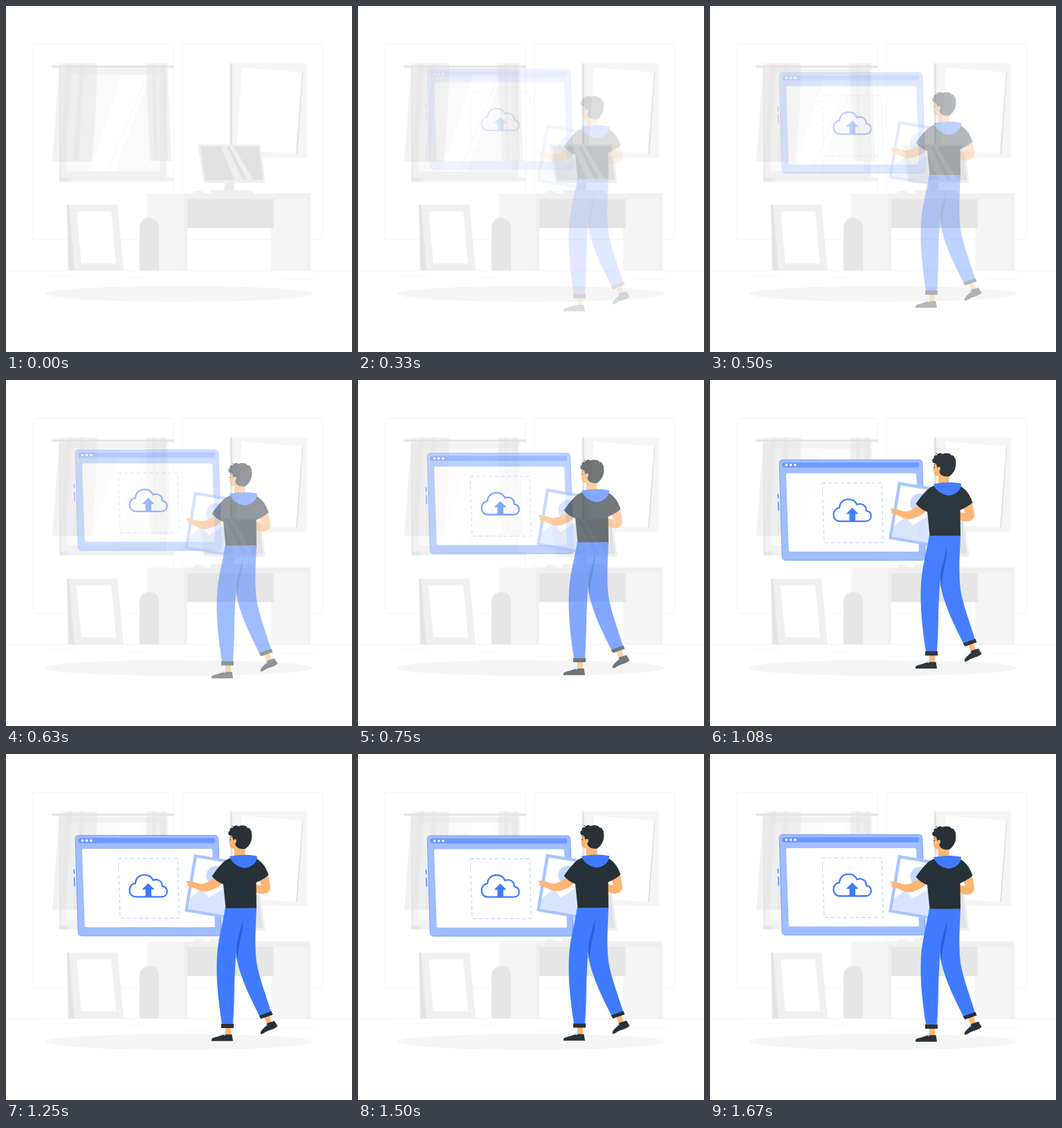
An HTML page for the animation above (1.71 s loop, 500 px wide and 500 px high).

```html
<!DOCTYPE html>
<html lang="en">
<head>
<meta charset="utf-8">
<title>Upload</title>
<style>
html, body { margin: 0; width: 100%; height: 100%; overflow: hidden; background: #fff; }
svg { display: block; width: 100%; height: 100%; }
</style>
</head>
<body>
<svg viewBox="0 0 500 500" xmlns="http://www.w3.org/2000/svg">
  <g id="room">
    <g fill="none" stroke="#f5f5f5">
      <rect x="39" y="55.5" width="203.5" height="282" rx="3"/>
      <rect x="255" y="55.5" width="203" height="282" rx="3"/>
    </g>
    <path d="M0 382.5H500" stroke="#f0f0f0" stroke-width=".8"/>
    <path d="M55 389.5H104M175 392.5H200M257 399.5H316M398 395.5H448" stroke="#f7f7f7" stroke-width=".8"/>
    <ellipse cx="250" cy="416" rx="194" ry="11.5" fill="#f5f5f5"/>

    <!-- window and curtains -->
    <path d="M77 91H232V248H77Z" fill="#f2f2f2"/>
    <path d="M77 248H242V253.5H77Z" fill="#f0f0f0"/>
    <path d="M77 248H90V253.5H77Z" fill="#e6e6e6"/>
    <path d="M77 91H79V248H77Z" fill="#e8e8e8"/>
    <path d="M88 99H222V239H88Z" fill="#fafafa"/>
    <path d="M167 99H202L146 239H120ZM205 99V106L157 239H148Z" fill="#fff"/>
    <rect x="66" y="86" width="177" height="3.4" rx="1" fill="#e6e6e6"/>
    <g fill="#e6e6e6" fill-opacity=".5">
      <path d="M77 83H132L130 150L124 225H67Z"/>
      <path d="M88 83H95L86 225H78ZM107 83H114L104 225H97Z" fill-opacity=".55"/>
      <path d="M202 83H233L239 224H208Z"/>
      <path d="M211 83H215L219 224H215ZM226 83H229L234 224H231Z" fill-opacity=".55"/>
    </g>

    <!-- wall picture -->
    <path d="M324 83H435V219.5H324Z" fill="#f5f5f5"/>
    <path d="M324 83H327V219.5H324Z" fill="#e3e3e3"/>
    <path d="M427 97L429.500 96L421 214.500L418 213.500Z" fill="#e0e0e0"/>
    <path d="M341 89L428 96L419 213.500L333 208Z" fill="#fff"/>

    <!-- leaning frame -->
    <path d="M88 287H94L102 382H90Z" fill="#e3e3e3"/>
    <path d="M91 287H161L170 382H99Z" fill="#f0f0f0"/>
    <path d="M102 297H152L159 372H109Z" fill="#fff"/>

    <!-- desk -->
    <path d="M204 271H262V382H204ZM383 279H435V382H383Z" fill="#f5f5f5"/>
    <path d="M257 271H440V382H435V279H262V382H257Z" fill="#f0f0f0"/>
    <path d="M262 279H387V321H262Z" fill="#e6e6e6"/>
    <path d="M193 382V320A14 14 0 0 1 221 320V382Z" fill="#e6e6e6"/>
    <path d="M270 271C270 266 287 266 287 271ZM296 266H353Q358 267 359 271H296Z" fill="#f0f0f0"/>
    <path d="M317 254H331L329 267H315Z" fill="#ebebeb"/>
    <path d="M277 200H367L375 255.500H286Z" fill="#f0f0f0"/>
    <path d="M281 203H365L371.500 251.500H288Z" fill="#e2e2e2"/>
    <path d="M310 203H319L342 251.500H331ZM323 203H329L357 251.500H349Z" fill="#f0f0f0"/>
  </g>

  <g id="tablet" opacity="0">
    <path d="M97.500 165.500H99L99.300 172H98ZM98 177H99.300L99.800 190H98.500Z" fill="#407bff"/>
    <path d="M105 116.300H302Q306.500 116.300 306.800 121L311 256Q311 261.500 306 261.500H110Q104.500 261.500 104.200 256.500L100.200 121.500Q100.200 116.300 105 116.300Z" fill="#9fbdff" stroke="#6c99ff" stroke-width=".9"/>
    <path d="M107 120H300Q302.500 120 302.500 123.700T300 127.500H107Q104 127.500 104 123.700T107 120Z" fill="#6c98ff"/>
    <g fill="#fff">
      <circle cx="110.500" cy="123.800" r="1.800"/>
      <circle cx="116.700" cy="123.800" r="1.800"/>
      <circle cx="123" cy="123.800" r="1.800"/>
      <path d="M112 135.700H296Q298 135.700 298.200 138L302 246.500Q302 249 300 249H116Q114 249 113.800 246.500L110 138Q110 135.700 112 135.700Z"/>
    </g>
    <path d="M162 149.700H248L250.300 236H165Z" fill="none" stroke="#b3caff" stroke-dasharray="5 4"/>
    <path d="M188 205C182 205 178.500 200.500 178.500 195.500C178.500 190 182 186 187 185.500C187.500 178 193 173.300 200 173.300C206 173.300 210.500 176.500 212.500 181C219 178.500 226 182 225.800 189.800C230 190.500 232.800 193.500 232.800 197.500C232.800 202 229.500 205 225 205Z" fill="none" stroke="#407bff" stroke-width="2.300"/>
    <path d="M205.500 185.500L214.700 194.500H210V205H201.500V194.500H196.500Z" fill="#407bff"/>
  </g>

  <g id="person" opacity="0">
    <!-- photo -->
    <g transform="translate(272 146) rotate(9.600)">
      <rect width="62" height="84" fill="#a9c5ff"/>
      <rect x="4.500" y="4.500" width="53" height="75" fill="#fff"/>
      <circle cx="36" cy="25.500" r="14" fill="#c6d8ff"/>
      <path d="M4.500 64L19 48L31 59L49 43L57.500 50V79.500H4.500Z" fill="#d9e5ff"/>
    </g>

    <!-- arms -->
    <g fill="#ffb573">
      <path d="M303 179C297 184 290 188 283 189C278 189 273 186 269 185.500L261 184.500C260 186 262 187.500 263.500 188C261.500 189 262 192 264.500 193L270 194C275 196 280 200 288 200C298 199 306 194 313 188Z"/>
      <path d="M378 175C380 182 382 189 382 194C382 200 377 203.500 371 203.500C366 203.500 362 202 360 199L361 190L369 191L365 182Z"/>
    </g>

    <!-- feet -->
    <path d="M317 395H325V410H317ZM373 381L380 378L384 390L378 394Z" fill="#ffb573"/>
    <path d="M297 414C297 411.500 301 411 305 410L315 406.500L326.500 406.500L328 416H297ZM368 406C367 402 370 400 373 397L378 390L388 387L392.500 394.500C389 399 380 400 375 403C372 405 370 406.500 368 406Z" fill="#263238"/>
    <path d="M312 407L316 403.500L317 408ZM374 396L375 391L378 393Z" fill="#c6d8ff"/>

    <!-- trousers -->
    <path d="M331 224H362C361 250 359 276 362 302C366 326 376 350 383 374L367 381C355 357 338 325 333 294Z" fill="#407bff"/>
    <path d="M317 223H351C345 246 337 266 333 285C329 320 331 356 328 391H312C307 360 303 325 305 292C307 267 313 247 317 223Z" fill="#407bff"/>
    <path d="M342 241C343 258 338 268 336 285L333.500 299C332 280 334 270 338 258Z" fill="#2d5fd0"/>
    <path d="M311 391H329V397.300H311ZM365.500 379.500L383.500 373L385.500 378L368.500 384Z" fill="#263238"/>

    <!-- shirt and hood -->
    <path d="M323 152C315 155 307 164 297.500 178C302 183 307 187 314 189.500L317.500 224H362L361.500 187C368 184 374 181 379.500 176C376 166 372 159 363 153Z" fill="#263238"/>
    <path d="M330 130L345.500 135V152C340 156 333 154 330 150Z" fill="#ffb573"/>
    <path d="M323 149.500C333 147 352 146 363 149C364 155 357 165 345 166C334 165 325 157 323 149.500Z" fill="#407bff"/>

    <!-- head -->
    <path d="M325 117C323 122 323.500 126 322.300 131.500L324 132.500C324 137 325.500 138.800 331 137.500L340 140L345 122Z" fill="#ffb573"/>
    <path d="M324 124V126.500M323.500 121.500L325.500 121" stroke="#263238" stroke-width="1.100"/>
    <path d="M323.500 134L326 133.500" stroke="#c97f48" stroke-width=".7"/>
    <path d="M323 119C320 116 321 113 324 112C322 110 325 107 328 108C329 104 334 104 336 106C340 104 347 104 349 108C352 108 353 109 353 110.500C356 114 355.500 121 355 124C354 130 350 136 345 138.500C339 139 333 137 332 133C330 131 333 128 332.500 125C331 124 329 126 329.500 129C327 124 329 119 323 119Z" fill="#263238"/>
    <path d="M349 112C352 111 354 112 355 114M329 109C329 106 327 105 326 105" fill="none" stroke="#263238" stroke-width="1"/>
    <ellipse cx="330.500" cy="127.500" rx="2.300" ry="3" fill="#ffb573"/>
  </g>
</svg>
<script>
const LOOP = 1710, FPS = 24, LEAD = 25, SHIFT = 30;
const tablet = document.getElementById('tablet');
const person = document.getElementById('person');

const bezier = (a, b, s) => 3 * a * s * (1 - s) ** 2 + 3 * b * s * s * (1 - s) + s ** 3;

// cubic-bezier(.36, -.01, .5, 1.38)
function ease(x) {
  let lo = 0, hi = 1;
  for (let i = 0; i < 30; i++) {
    const mid = (lo + hi) / 2;
    if (bezier(.36, .5, mid) < x) lo = mid; else hi = mid;
  }
  return bezier(-.01, 1.38, lo);
}

function place(el, dy, alpha) {
  el.setAttribute('transform', `translate(0 ${dy.toFixed(2)})`);
  el.setAttribute('opacity', alpha.toFixed(3));
}

function draw(ms) {
  const step = Math.floor((ms % LOOP) * FPS / 1000 + .1);
  const y = ease(Math.min(1, (step * 1000 / FPS + LEAD) / LOOP));
  const alpha = step < 4 ? 0 : Math.min(1, y);
  const dy = SHIFT * (1 - y);
  place(tablet, -dy, alpha);
  place(person, dy, alpha);
}

const start = performance.now();
function tick(now) {
  draw(Math.max(0, now - start));
  requestAnimationFrame(tick);
}
draw(0);
requestAnimationFrame(tick);
</script>
</body>
</html>
```
